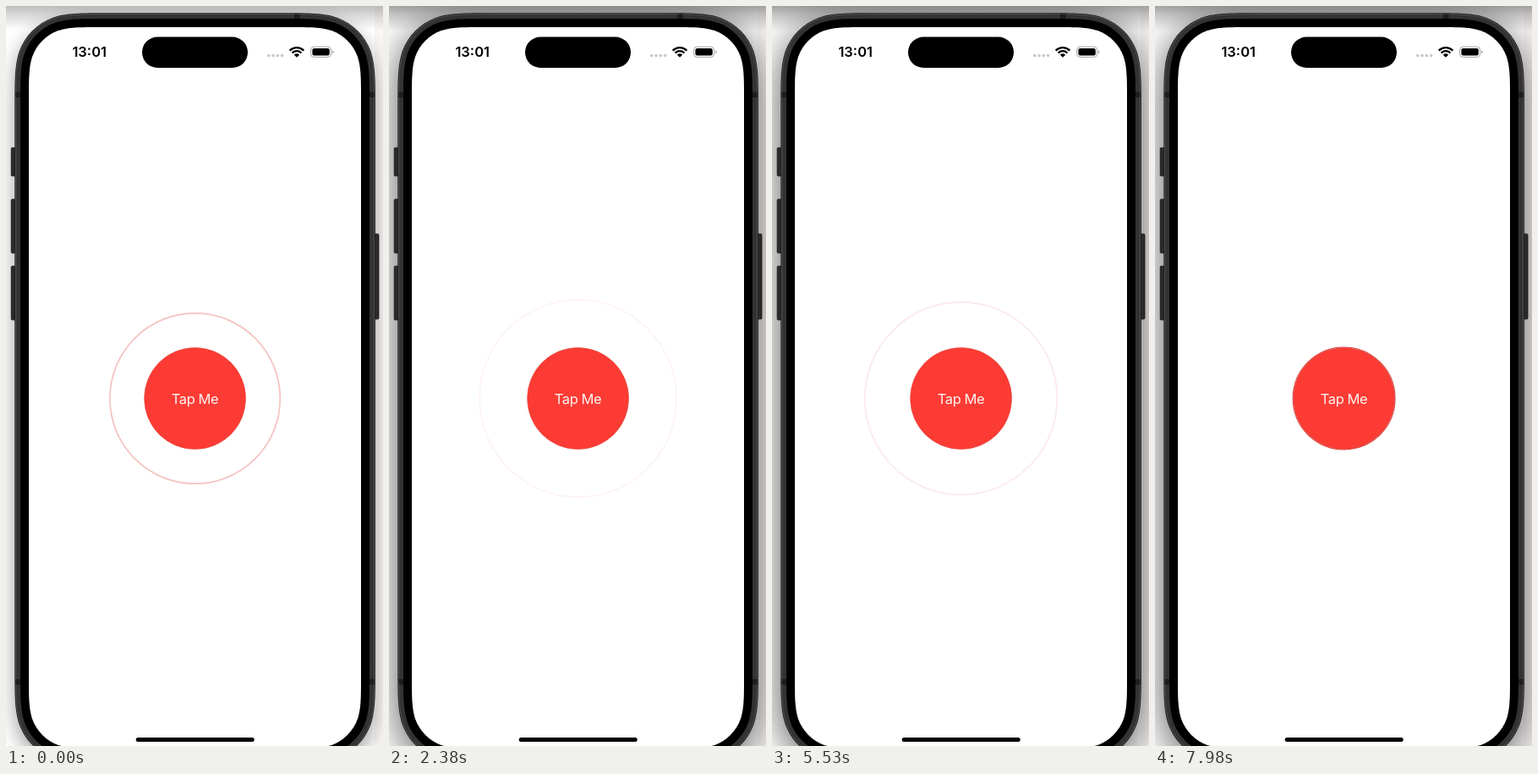
Animation, 446 px wide and 874 px high, one loop 8 s. Source, as an HTML page:

```html
<!DOCTYPE html>
<html lang="en">
<head>
<meta charset="utf-8">
<title>Pulsing button</title>
<style>
  html, body { margin: 0; width: 100%; height: 100%; overflow: hidden; background: #fff; }
  svg { display: block; width: 100%; height: 100%; }
  text { font-family: Inter, Roboto, sans-serif; font-size: 16.5px; }
</style>
</head>
<body>
<svg viewBox="0 0 446 874">
  <defs>
    <filter id="soft" filterUnits="userSpaceOnUse" x="-100" y="-100" width="646" height="1150">
      <feGaussianBlur stdDeviation="12"/>
    </filter>
    <filter id="deep" filterUnits="userSpaceOnUse" x="-100" y="-100" width="646" height="1150">
      <feGaussianBlur stdDeviation="24"/>
    </filter>
    <linearGradient id="topShade" x2="0" y2="1">
      <stop offset="0" stop-opacity="1"/>
      <stop offset=".3" stop-opacity=".65"/>
      <stop offset="1" stop-opacity="0"/>
    </linearGradient>
    <clipPath id="wedge"><path d="M344 60.8l-12-11.8v-10h24v10z"/></clipPath>
  </defs>

  <rect width="446" height="874" fill="#fff"/>
  <g id="idle">
    <path class="body" transform="translate(0 10)" filter="url(#soft)" opacity=".38"/>
    <rect width="446" height="28" fill="url(#topShade)" opacity=".26"/>
  </g>
  <g id="focus">
    <path class="body" transform="translate(0 10)" filter="url(#deep)" opacity=".65"/>
    <rect width="446" height="30" fill="url(#topShade)" opacity=".36"/>
  </g>
  <rect x="436" width="10" height="874" fill="#a0685e" opacity=".06"/>

  <!-- side buttons -->
  <g fill="#2b2b2b" stroke="#111" stroke-width=".8">
    <rect x="6.2" y="167.4" width="6" height="33.4" rx="1.2"/>
    <rect x="6.2" y="228.2" width="6" height="63.6" rx="1.2"/>
    <rect x="6.2" y="307.2" width="6" height="63.6" rx="1.2"/>
    <rect x="435" y="269.2" width="6" height="100.6" rx="1.2"/>
  </g>

  <!-- case, bezel and screen -->
  <path class="body" fill="#1a1a1a"/>
  <path id="rim" fill="#333" stroke="#5c5c5c" stroke-width=".8"/>
  <g fill="#1d1d1d">
    <rect x="11.5" y="101.5" width="6" height="6.5"/>
    <rect x="430" y="101.5" width="5.5" height="6.5"/>
    <rect x="11.5" y="795" width="6" height="6.5"/>
    <rect x="430" y="795" width="5.5" height="6.5"/>
    <rect x="341" y="9.5" width="6.5" height="6"/>
  </g>
  <path id="bezel" fill="#000"/>
  <path id="screen" fill="#fff"/>

  <!-- status bar -->
  <rect x="161" y="36.5" width="125" height="36.5" rx="18.25"/>
  <text x="98.7" y="60.4" text-anchor="middle" font-weight="600">13:01</text>
  <g fill="#c9c9c9">
    <circle cx="310.7" cy="58.6" r="1.8"/>
    <circle cx="316" cy="58.6" r="1.8"/>
    <circle cx="321.3" cy="58.6" r="1.8"/>
    <circle cx="326.6" cy="58.6" r="1.8"/>
  </g>
  <g clip-path="url(#wedge)" fill="none" stroke="#000" stroke-width="2.4">
    <circle cx="344" cy="60.4" r="11.3"/>
    <circle cx="344" cy="60.4" r="7.3"/>
    <circle cx="344" cy="60.4" r="2.1" stroke-width="4.2"/>
  </g>
  <rect x="360.6" y="48.2" width="24" height="12.2" rx="3.8" fill="none" stroke="#a3a3a3"/>
  <rect x="362.4" y="50" width="20.4" height="8.6" rx="2.3"/>
  <path d="M386 52.4q1.5.5 1.5 1.9t-1.5 1.9z" fill="#a3a3a3"/>

  <!-- button and pulse -->
  <circle cx="223.6" cy="463.5" r="60" fill="#fc3b34" stroke="#d8463f" stroke-width=".5"/>
  <text x="223.5" y="469.6" text-anchor="middle" letter-spacing="-.45" fill="#fff" fill-opacity=".95">Tap Me</text>
  <circle id="ring" cx="223.6" cy="463.5" fill="none" stroke="#d8423c"/>

  <rect x="153.7" y="864" width="140" height="5" rx="2.5"/>
</svg>
<script>
  const LOOP = 8000, STEP = 70, PULSE = 1070, OFFSET = 649, FOCUS_AT = 1890;
  const $ = id => document.getElementById(id);

  // Rounded rectangle with smooth, continuous corners.
  function squircle(left, top, right, bottom, r) {
    const edge = [[1.5287, 0], [1.0885, 0], [.8684, 0], [.6315, .0749],
                  [.3728, .169], [.169, .3728], [.0749, .6315],
                  [0, .8684], [0, 1.0885], [0, 1.5287]];
    const corner = (x, y, sx, sy, back) => {
      const pts = edge.map(([u, v]) => `${x + sx * u * r} ${y + sy * v * r}`);
      if (back) pts.reverse();
      return pts[0] + 'C' + pts.slice(1).join(' ');
    };
    return 'M' + corner(left, top, 1, 1, true) +
           'L' + corner(right, top, -1, 1) +
           'L' + corner(right, bottom, -1, -1, true) +
           'L' + corner(left, bottom, 1, -1) + 'Z';
  }

  // Cubic ease-in-out with handles at .42 and .58.
  function easeInOut(x) {
    let lo = 0, hi = 1;
    for (let i = 0; i < 30; i++) {
      const s = (lo + hi) / 2, q = 1 - s;
      if (1.26 * s * q * q + 1.74 * s * s * q + s * s * s < x) lo = s;
      else hi = s;
    }
    return lo * lo * (3 - 2 * lo);
  }

  function draw(now) {
    const t = Math.floor(now % LOOP / STEP) * STEP;
    const p = easeInOut((t + OFFSET) % PULSE / PULSE);
    const ring = $('ring');
    ring.setAttribute('r', 60 * (1 + p));
    ring.setAttribute('stroke-width', 1 + p);
    ring.setAttribute('opacity', 1 - p);
    const focused = t >= FOCUS_AT;
    $('idle').setAttribute('visibility', focused ? 'hidden' : 'visible');
    $('focus').setAttribute('visibility', focused ? 'visible' : 'hidden');
  }

  const body = squircle(10.3, 8.3, 436.9, 893.7, 71.5);
  document.querySelectorAll('.body').forEach(el => el.setAttribute('d', body));
  $('rim').setAttribute('d', squircle(11.6, 9.6, 435.6, 892.4, 70.2));
  $('bezel').setAttribute('d', squircle(17, 15, 430, 887, 65));
  $('screen').setAttribute('d', squircle(27, 25, 420, 877, 55));

  function tick() {
    draw(performance.now());
    requestAnimationFrame(tick);
  }
  tick();
</script>
</body>
</html>
```
